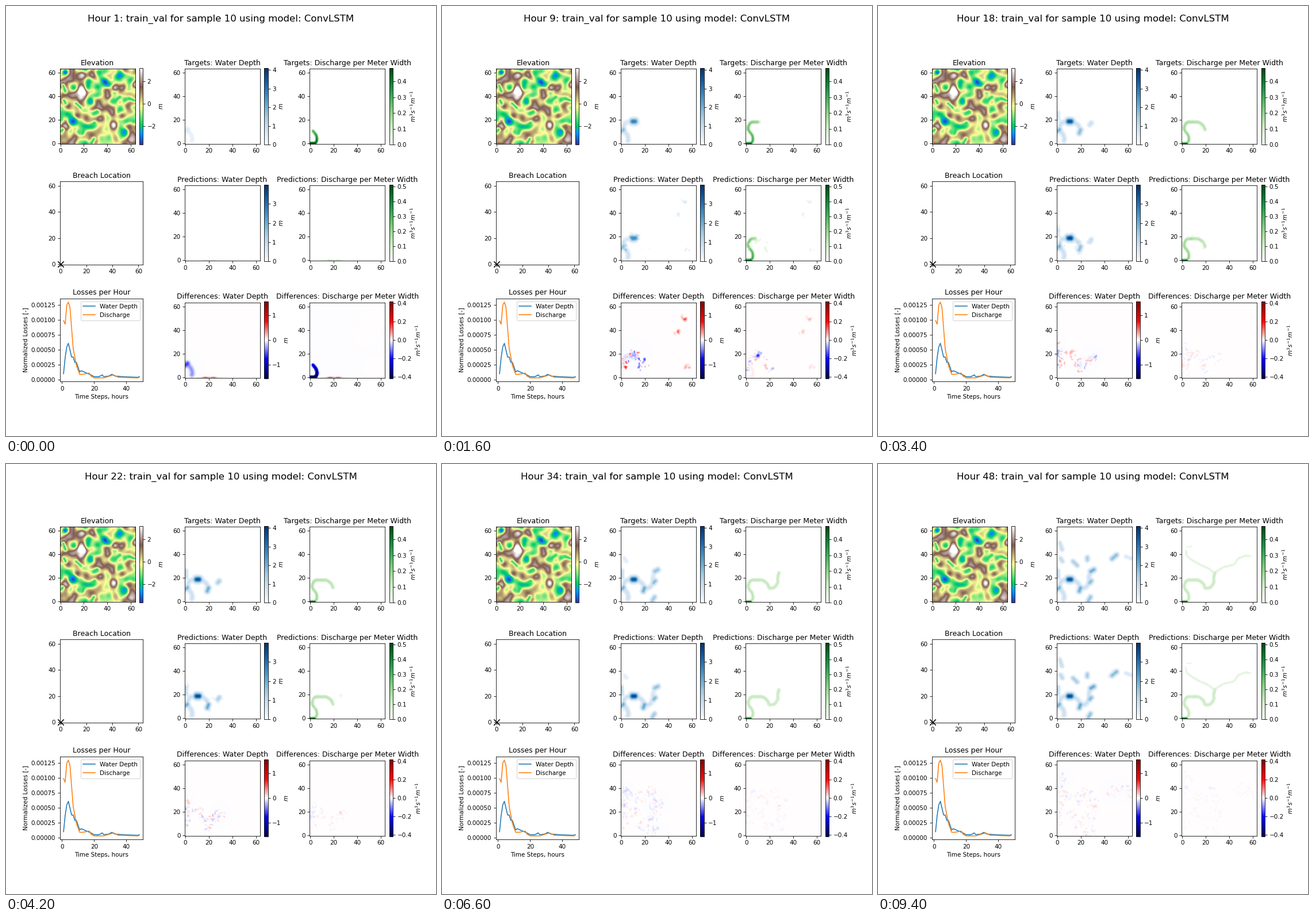
Write a matplotlib script that moves like this. It is 748 by 748 pixels and loops after 9.6 s.

```python
import matplotlib.pyplot as plt
import numpy as np
from matplotlib.animation import FuncAnimation
from matplotlib.colors import ListedColormap

N = 64
HOURS = 48
Y, X = np.mgrid[0:N, 0:N].astype(float)


def smooth_noise(seed, passes=1):
    """Unit-variance noise blurred with a small binomial kernel."""
    n = np.random.default_rng(seed).standard_normal((N, N))
    for _ in range(passes):
        for axis in (0, 1):
            n = (np.roll(n, 1, axis) + 2 * n + np.roll(n, -1, axis)) / 4
    return n / n.std()


def spot(x, y, size):
    return np.exp(-((X - x) ** 2 + (Y - y) ** 2) / (2 * size ** 2))


# ------------------------------------------------------------ water depth
# x, y, length, angle, depth, first hour
PONDS = [(10.5, 18.5, 2, 0, 3.7, 2), (1, 11, 2, 45, 2, 0),
         (0.3, 23, 6, 90, 1.2, 11), (19, 10, 3, 70, 2.1, 10),
         (28, 16.5, 2, 50, 1.8, 15), (29.5, 26, 3, 30, 2.1, 27),
         (27, 2, 4, 60, 1.7, 25), (15, 32, 5, 135, 1.4, 34),
         (3.5, 35, 3, 120, 1.1, 32), (25.3, 36, 2, 90, 1.5, 34),
         (48, 37.5, 5, 40, 1.8, 37), (60, 37, 5, 160, 0.8, 42),
         (3, 46.5, 6, 110, 1.2, 41)]


def pond_shape(x, y, length, angle, depth, _):
    """Distance to a short tilted line, and the bowl around it."""
    c, s = np.cos(np.radians(angle)), np.sin(np.radians(angle))
    along, across = (X - x) * c + (Y - y) * s, (Y - y) * c - (X - x) * s
    dist = np.hypot(np.maximum(np.abs(along) - length / 2, 0), across)
    return dist, np.exp(-(dist / (1.3 + 0.35 * depth)) ** 2)


POND_DIST, POND_BOWL = zip(*(pond_shape(*p) for p in PONDS))

# -------------------------------------------------------------- discharge
# Points, first and last arrival hour, radius, steady flow, first surge
REACHES = [
    ([(0, 0), (4.5, 0), (6, 3), (5.2, 7), (2, 11)], 0, 0.2, 1.3, 0.11, 0.46),
    ([(2, 11), (1.5, 14), (4, 18), (14, 18), (18, 15), (19.5, 11)],
     2, 14, 1.4, 0.11, 0.28),
    ([(19.5, 11), (24, 11.5), (27, 16), (26.5, 20), (28, 25)],
     22, 33, 1.4, 0.11, 0.1),
    ([(27, 24), (22, 28), (15, 31), (8, 35), (4, 38), (3, 43)],
     34, 46, 0.85, 0.07, 0),
    ([(27, 24), (35, 29), (44, 31), (47, 36), (53, 38.5), (58, 38)],
     34, 46, 0.85, 0.07, 0),
    ([(4, 46), (9, 46.5)], 46, 47, 0.7, 0.05, 0),
]


def trace(points, start, end, radius, steady, surge):
    """Sample a rounded path: distances, arrival hours, radii and flows."""
    x, y = np.array(points, float).T
    length = np.concatenate([[0], np.cumsum(np.hypot(np.diff(x), np.diff(y)))])
    s = np.arange(0, length[-1], 0.4)

    def rounded(v):
        padded = np.pad(np.interp(s, length, v), 4, mode="edge")
        return np.convolve(padded, np.ones(9) / 9, "valid")

    px, py = rounded(x), rounded(y)
    dist = np.hypot(X - px[:, None, None], Y - py[:, None, None])
    return (dist, np.linspace(start, end, s.size), np.full(s.size, radius),
            np.full(s.size, steady), surge * np.exp(-s / 30))


FLOW_DIST, ARRIVAL, RADIUS, STEADY, SURGE = (
    np.concatenate(part) for part in zip(*(trace(*r) for r in REACHES)))
FLOW_SHAPE = np.exp(-(FLOW_DIST / RADIUS[:, None, None]) ** 4)
# Only the wide channel, past the inflow, leaves standing water
CHANNEL = (RADIUS > 1) & (np.arange(RADIUS.size) > 16)
TRAIL_SHAPE = np.exp(-(FLOW_DIST[CHANNEL] / 1.9) ** 2)


def water_depth(hour):
    filled = np.sqrt(np.clip((hour - ARRIVAL[CHANNEL]) / 6, 0, 1))
    total = (0.9 * filled[:, None, None] * TRAIL_SHAPE).max(axis=0) ** 3
    for bowl, (*_, depth, start) in zip(POND_BOWL, PONDS):
        grown = np.sqrt(np.clip((hour - start) / 11, 0, 1))
        total += (depth * grown * bowl) ** 3
    return np.cbrt(total)


def discharge(hour):
    arrived = np.clip(hour - ARRIVAL, 0, 1)
    rate = arrived * (STEADY + SURGE * np.exp(-hour / 14))
    flow = (rate[:, None, None] * FLOW_SHAPE).max(axis=0)
    flow[0, :5] = np.maximum(flow[0, :5], 0.45 * np.clip(hour, 0, 1))
    return flow


def wet_area(hour):
    area = np.zeros((N, N), bool)
    for dist, pond in zip(POND_DIST, PONDS):
        if hour + 2 > pond[-1]:
            area |= dist < 5
    return area


# ---------------------------------------------------------------- terrain
def make_elevation():
    """Rolling noise, lowered under the ponds, with a few marked extremes."""
    ground = 0.15 + 1.2 * smooth_noise(11, 10)
    marks = [(bowl, -1.7) for bowl in POND_BOWL]
    marks += [(spot(x, y, 2.4), h) for x, y, h in [
        (17, 39, 3.1), (46, 47, 2.6), (60, 3, 2.7), (4, 60, -3.3),
        (10.5, 18.5, -3.3), (54, 10, -2.8), (25, 35.5, -2.5), (11, 47, -2)]]
    for weight, level in marks:
        ground += weight * (level - ground)
    return ground


# ------------------------------------------------------------ predictions
def speckle(hour, kind):
    n = smooth_noise(10 * hour + kind)
    return np.where(np.abs(n) > 1, n, 0)


def false_spots(hour):
    fade = np.exp(-((hour - 7.5) / 3.2) ** 2)
    spots = sum(spot(x, y, 1.5) for x, y in [(47, 38), (53, 50), (56, 8)])
    return 0.8 * fade * spots * np.clip(0.4 + 0.6 * smooth_noise(hour), 0, 1.5)


def bottom_leak(hour):
    wave = np.exp(-((X - 20) / 7) ** 2) * (1 + 0.5 * np.sin(X * 0.8 + 1))
    return wave * (Y == 0) / hour ** 2


def predict(hour):
    """Late copy of the truth with errors that fade over the hours."""
    lag = 0.4 + 5 * np.exp(-hour / 5)
    wet = wet_area(hour) * (hour > 1)
    depth = water_depth(hour - lag) + false_spots(hour) + 0.4 * bottom_leak(hour)
    depth += wet * speckle(hour, 1) * (0.035 + 0.7 * np.exp(-hour / 8))
    flow = discharge(hour - lag) + 0.1 * false_spots(hour)
    flow += 0.12 * bottom_leak(hour)
    flow += wet * speckle(hour, 2) * (0.004 + 0.09 * np.exp(-hour / 7))
    return depth, flow


def panels(hour):
    depth, flow = water_depth(hour), discharge(hour)
    pred_depth, pred_flow = predict(hour)
    return depth, flow, pred_depth, pred_flow, pred_depth - depth, pred_flow - flow


# ----------------------------------------------------------------- losses
# Key points (hour, loss in units of 1e-5), joined by straight lines
DEPTH_LOSS = [(1, 10), (2, 37), (3, 55), (4, 61), (6, 38), (7, 38), (8, 29),
              (9, 29), (11, 13), (12, 15), (18, 8), (20, 5), (23, 5), (25, 8),
              (26, 5), (29, 6), (31, 9), (33, 6), (38, 5), (47, 4), (48, 5)]
FLOW_LOSS = [(1, 99), (2, 93), (3, 125), (4, 130), (5, 121), (7, 52), (9, 24),
             (11, 9), (13, 9), (17, 11), (18, 6), (20, 3), (26, 3), (32, 8),
             (35, 4), (47, 3), (48, 4)]


# ----------------------------------------------------------------- figure
plt.rcParams["font.family"] = "DejaVu Sans"
fig, axes = plt.subplots(3, 3, figsize=(10, 10), dpi=74.8)
fig.subplots_adjust(left=0.125, right=0.9, bottom=0.11, top=0.88,
                    wspace=0.5, hspace=0.2)
heading = fig.suptitle("", fontsize=16)
TICKS = [0, 20, 40, 60]


def white_based(name):
    colors = plt.get_cmap(name)(np.linspace(0, 1, 256))
    colors[:8] = 1
    return ListedColormap(colors)


def add_map(ax, title, data, cmap, low, high, unit):
    image = ax.imshow(data, cmap=cmap, vmin=low, vmax=high, origin="lower")
    ax.set(title=title, xticks=TICKS, yticks=TICKS)
    fig.colorbar(image, ax=ax, fraction=0.046, pad=0.05, label=unit)
    return image


METER, FLOW_UNIT = "$m$", "$m^3s^{-1}m^{-1}$"
BLUES, GREENS = white_based("Blues"), white_based("Greens")
blank = np.zeros((N, N))

add_map(axes[0, 0], "Elevation", make_elevation(), "terrain", -3.63, 3.17, METER)

breach = axes[1, 0]
breach.set(title="Breach Location", xlim=(-0.5, 63.5), ylim=(-0.5, 63.5),
           xticks=TICKS, yticks=TICKS)
breach.set_box_aspect(1)
breach.scatter([0], [0], s=100, c="black", marker="x", clip_on=False, zorder=5)

loss = axes[2, 0]
steps = np.arange(1, HOURS + 1)
for keys, label in [(DEPTH_LOSS, "Water Depth"), (FLOW_LOSS, "Discharge")]:
    loss.plot(steps, 1e-5 * np.interp(steps, *zip(*keys)), label=label)
loss.set(title="Losses per Hour", xlabel="Time Steps, hours",
         ylabel="Normalized Losses [-]")
loss.set_box_aspect(1)
loss.legend(loc="upper right")

images = []
for row, (name, depth_style, flow_style) in enumerate([
        ("Targets", (BLUES, 0, 4.11), (GREENS, 0, 0.485)),
        ("Predictions", (BLUES, 0, 3.99), (GREENS, 0, 0.512)),
        ("Differences", ("seismic", -1.54, 1.54), ("seismic", -0.417, 0.417))]):
    images.append(add_map(axes[row, 1], f"{name}: Water Depth",
                          blank, *depth_style, METER))
    images.append(add_map(axes[row, 2], f"{name}: Discharge per Meter Width",
                          blank, *flow_style, FLOW_UNIT))


def update(frame):
    hour = frame + 1
    heading.set_text(
        f"Hour {hour}: train_val for sample 10 using model: ConvLSTM")
    for image, data in zip(images, panels(hour)):
        image.set_data(data)
    return [heading, *images]


anim = FuncAnimation(fig, update, frames=HOURS, interval=200, repeat=True,
                     repeat_delay=0, blit=False)
plt.show()
```
